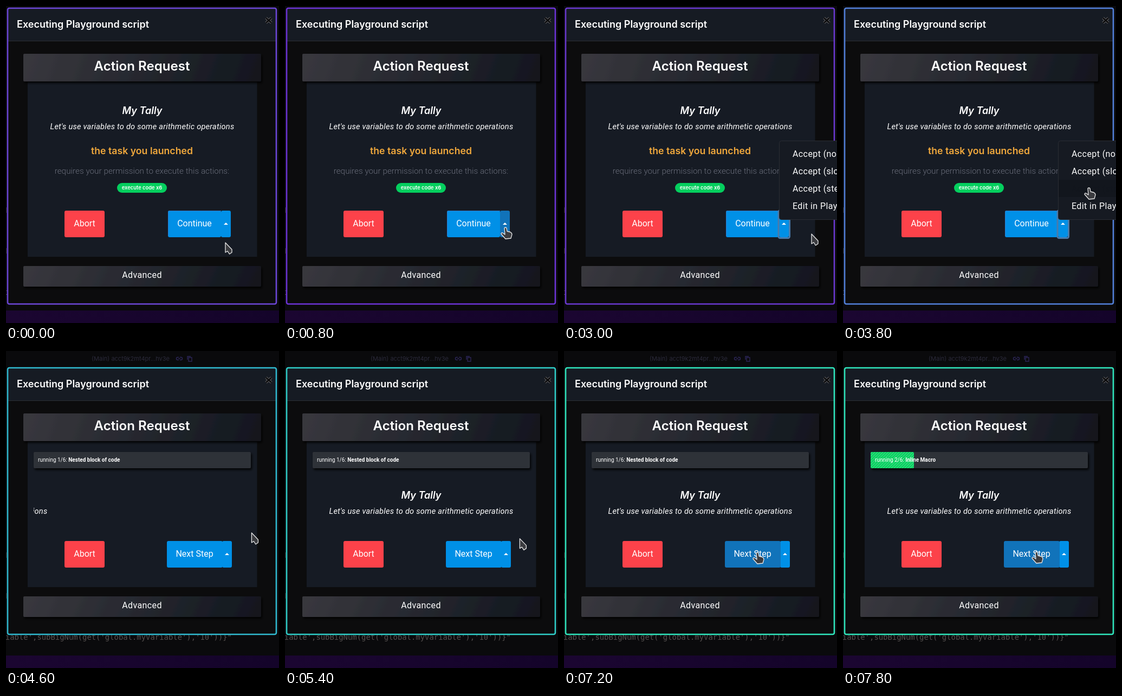
Write an HTML page that moves like this. It is 504 by 584 pixels and loops after 8 s.

```html
<!DOCTYPE html>
<html lang="en">
<head>
<meta charset="utf-8">
<title>Script dialog</title>
<style>
  html, body { margin: 0; width: 100%; height: 100%; overflow: hidden; background: #0a0a0c; }
  svg { display: block; }
  text { font-family: Roboto, sans-serif; font-size: 16px; fill: #fff; }
  .mid { text-anchor: middle; }
  .head { font-family: Inter, sans-serif; font-weight: 600; font-size: 18px; }
  .big { font-size: 24.1px; }
  .italic { font-style: italic; }
  .note { font-size: 14.6px; font-style: italic; letter-spacing: .23px; }
  .small { font-size: 10px; }
  .bold { font-weight: 700; }
  .loose text { letter-spacing: .4px; }
  .code { font: 13.9px "DejaVu Sans Mono", monospace; fill: #55504f; text-anchor: end; }
</style>
</head>
<body>
<svg width="504" height="584" viewBox="0 0 504 584">
  <defs>
    <linearGradient id="bar" x2="1" y2=".04">
      <stop stop-color="#39383e"/><stop offset=".5" stop-color="#26282f"/><stop offset="1" stop-color="#12171f"/>
    </linearGradient>
    <linearGradient id="strip"><stop stop-color="#1b0631"/><stop offset="1" stop-color="#14042a"/></linearGradient>
    <pattern id="stripes" width="5" height="5" patternUnits="userSpaceOnUse">
      <rect width="5" height="5" fill="#08cf60"/>
      <path d="M-1 1L1 -1M0 5L5 0M4 6L6 4" stroke="#35dd7e" stroke-width="1.3"/>
    </pattern>
    <filter id="shadow" x="-5%" y="-20%" width="112%" height="160%">
      <feDropShadow dx="2" dy="3" stdDeviation="2" flood-color="#000" flood-opacity=".9"/>
    </filter>
    <clipPath id="lane"><rect x="51" y="240" width="401" height="75"/></clipPath>
  </defs>

  <rect width="504" height="584" fill="#0a0a0c"/>
  <text x="158" y="18" style="font:11px Inter,sans-serif;fill:#2b2a3a">(Main) acct9k2mt4pr...hv3e</text>
  <g fill="none" stroke="#2b2556" stroke-width="1.4">
    <path d="M319 11.500h-2a2.500 2.500 0 0 0 0 5h2M321 11.500h2a2.500 2.500 0 0 1 0 5h-2M318 14h4"/>
    <path d="M337 12h6v7h-6zM335 16v-6h6"/>
  </g>
  <path d="M.5 371v10M.5 446v10" stroke="#3d3838"/>
  <text class="code" x="417" y="532">iable',subBigNum(get('global.myVariable'),'10'))}"</text>
  <rect y="561" width="504" height="23" fill="url(#strip)"/>

  <rect id="modal" x="3" width="496" rx="3" fill="#0c0c0d"/>
  <g id="top">
    <rect x="4" y="5" width="494" height="59" fill="#161b23"/>
    <path d="M4 64.500H498" stroke="#2c2f35"/>
    <text class="head" x="20" y="40">Executing Playground script</text>
    <g fill="none">
      <path d="M480 22L490 31M490 22L480 31" stroke="#5c5c5e" stroke-width="5"/>
      <path d="M480 22L490 31M490 22L480 31" stroke="#0b0b0c" stroke-width="2.600"/>
    </g>
  </g>
  <rect id="card" x="40" width="423.500" fill="#161b24"/>
  <g id="banner">
    <rect x="32" y="88" width="439" height="51" rx="2" fill="url(#bar)" filter="url(#shadow)"/>
    <text class="head big mid" x="251" y="119">Action Request</text>
  </g>
  <g id="advanced">
    <rect x="32" y="479" width="439" height="38" rx="2" fill="url(#bar)" filter="url(#shadow)"/>
    <text class="mid" x="251" y="501" style="letter-spacing:.4px">Advanced</text>
  </g>
  <rect id="edge" x="3" width="496" rx="3" fill="none" stroke-width="2.600"/>

  <g id="abort">
    <rect x="108" y="377" width="74" height="49" rx="3" fill="#fc424a"/>
    <text class="mid" x="145" y="406">Abort</text>
  </g>

  <g id="ask">
    <text class="head italic mid" x="251.500" y="199">My Tally</text>
    <text class="note mid" x="251.500" y="227">Let's use variables to do some arithmetic operations</text>
    <text class="head mid" x="251" y="273" style="font-size:17.700px;fill:#f0a83c">the task you launched</text>
    <text class="mid" x="251" y="309" style="font-size:15.3px;font-weight:300;fill:#6a6e7b">requires your permission to execute this actions:</text>
    <rect x="205" y="326" width="92" height="18" rx="9" fill="#04cf5e"/>
    <text class="mid" x="251" y="338.300" style="font:600 9.4px Inter,sans-serif">execute code x6</text>
    <rect x="299" y="377" width="98" height="49" rx="3" fill="#0090e7"/>
    <path d="M299.500 424V379.500Q299.500 377.500 301.500 377.500H397" fill="none" stroke="#2f7ed0"/>
    <rect id="toggle" x="397" y="377" width="18" height="49" rx="3"/>
    <path d="M402 403h8l-4-4z" fill="#fff"/>
    <text class="mid" x="348" y="406">Continue</text>
    <g id="menu">
      <rect x="396" y="376.500" width="20.500" height="51" rx="3" fill="none" stroke="#4a7aab" stroke-width="3"/>
      <rect x="397.500" y="248.500" width="120" height="145" rx="4" fill="#161a22" stroke="#2a2d34"/>
      <rect id="hover" x="398" width="106" height="32" fill="#12161d"/>
      <g id="items" class="loose"></g>
    </g>
  </g>

  <g id="run">
    <rect x="51" y="186" width="401" height="30" rx="2" fill="#2f3037" filter="url(#shadow)"/>
    <rect id="progress" x="51" y="186" height="30" rx="2" fill="url(#stripes)"/>
    <text class="small" x="59" y="204"><tspan id="count"></tspan> <tspan id="step" class="bold"></tspan></text>
    <g clip-path="url(#lane)">
      <g id="slide">
        <text class="head italic mid" x="251.500" y="272">My Tally</text>
        <text class="note mid" x="251.500" y="300">Let's use variables to do some arithmetic operations</text>
      </g>
    </g>
    <rect x="399" y="350" width="18" height="49" rx="3" fill="#0090e7"/>
    <rect id="next" x="297" y="350" width="103" height="49" rx="3"/>
    <path d="M404 376h8l-4-4z" fill="#fff"/>
    <text class="mid" x="348" y="379">Next Step</text>
  </g>

  <g id="cursor" fill="#3b3c40" stroke="#e8e8e8" stroke-width="1.300" stroke-linejoin="round">
    <path id="arrow" d="M0 0V18L4 15.500L7.500 21L12 18V12.500Z"/>
    <path id="hand" d="M-2 1Q0 -1 2 1L3 7L9 8.500Q12 10 12 13L10 20L0 21L-8 12Q-8 9 -5 10L-1 13Z"/>
  </g>
</svg>
<script>
const LOOP = 8000, TICK = 200;
const SWITCH = 4200, OPEN = 1800, ADVANCE = 7400;
const BLUE = '#0090e7', DARK_BLUE = '#1173ba';

// Each row: time, then the values reached at that time.
const cursorPath = [
  [0, 405, 436], [400, 405, 434], [800, 407, 408], [1400, 408, 408], [1600, 427, 433],
  [2200, 448, 428], [3000, 457, 420], [3400, 455, 372], [3800, 454, 335],
  [5200, 453, 335], [6200, 355, 388], [6400, 355, 386], [7200, 357, 371], [7800, 357, 370]
];
const edgeColors = [
  [0, 108, 70, 215], [1600, 108, 32, 212], [3000, 106, 56, 208], [3800, 82, 128, 218],
  [4600, 48, 186, 208], [6400, 46, 230, 191], [7800, 47, 230, 188]
];
const slideIn = [[4400, -401], [4600, -345], [4800, -150], [5000, -35], [5200, 0]];
const progressWidth = [[7200, 0], [7400, 24], [7600, 66], [7800, 80]];

const $ = id => document.getElementById(id);
const set = (id, attrs) => {
  for (const name in attrs) $(id).setAttribute(name, attrs[name]);
};
const show = (id, on) => set(id, { visibility: on ? 'visible' : 'hidden' });
const shift = (id, x, y) => set(id, { transform: `translate(${x} ${y})` });

function sample(rows, t) {
  const next = rows.findIndex(row => row[0] > t);
  if (next < 0) return rows.at(-1).slice(1);
  if (next === 0) return rows[0].slice(1);
  const a = rows[next - 1], b = rows[next];
  const k = (t - a[0]) / (b[0] - a[0]);
  return a.slice(1).map((v, i) => v + (b[i + 1] - v) * k);
}

const items = ['Accept (normal)', 'Accept (slow)', 'Accept (step)', 'Edit in Playground'].map((label, i) => {
  const text = document.createElementNS('http://www.w3.org/2000/svg', 'text');
  text.setAttribute('x', 422);
  text.setAttribute('y', 278 + 32 * i);
  text.textContent = label;
  $('items').append(text);
  return text;
});

function draw(t) {
  const running = t >= SWITCH;
  const menuOpen = t >= OPEN && !running;
  const dy = running ? 27 : 0;
  const [x, y] = sample(cursorPath, t);

  for (const id of ['modal', 'edge']) set(id, { y: 4 + dy, height: 545 - 2 * dy });
  set('edge', { stroke: `rgb(${sample(edgeColors, t).map(Math.round)})` });
  set('card', { y: 140 + dy, height: 322 - 2 * dy });
  shift('top', 0, dy);
  shift('banner', 0, dy);
  shift('advanced', 0, -dy);
  shift('abort', 0, -dy);
  $('ask').style.display = running ? 'none' : '';
  $('run').style.display = running ? '' : 'none';
  $('menu').style.display = menuOpen ? '' : 'none';

  const onToggle = t >= 800 && t < OPEN;
  const row = menuOpen && y < 392 ? Math.floor((y - 256) / 32) : -1;
  const onNext = running && x < 400;
  set('toggle', { fill: onToggle ? DARK_BLUE : BLUE });
  set('next', { fill: t >= 6600 ? DARK_BLUE : BLUE });
  show('hover', row >= 0);
  set('hover', { y: 256 + 32 * row });
  items.forEach((item, i) => { item.style.fill = i === row ? '#12161d' : '#fff'; });

  shift('slide', sample(slideIn, t)[0], 0);
  set('progress', { width: sample(progressWidth, t)[0] });
  $('count').textContent = t < ADVANCE ? 'running 1/6:' : 'running 2/6:';
  $('step').textContent = t < ADVANCE ? 'Nested block of code' : 'Inline Macro';

  const pointing = onToggle || row >= 0 || onNext;
  shift('cursor', x, y);
  show('hand', pointing);
  show('arrow', !pointing);
}

const start = performance.now();
function frame() {
  const t = (performance.now() - start) % LOOP;
  draw(Math.floor(t / TICK) * TICK);
  requestAnimationFrame(frame);
}
frame();
</script>
</body>
</html>
```
